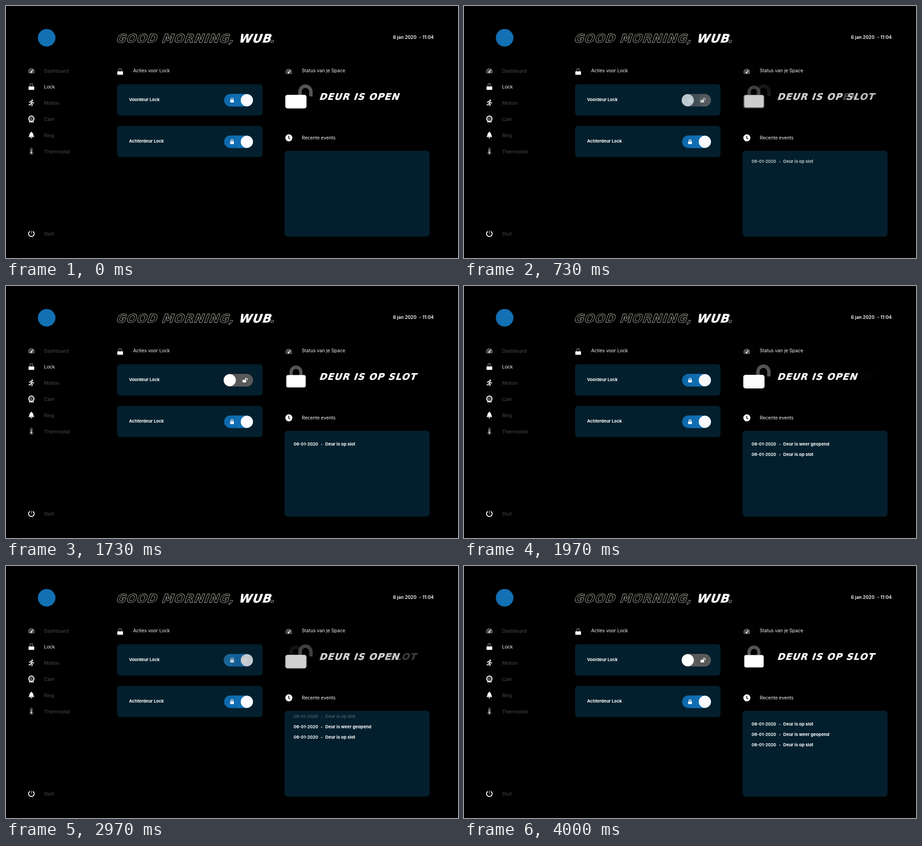
Recreate the animation shown at these times as an HTML page. Size 1001 px wide and 559 px high, loop 4030 ms.

```html
<!DOCTYPE html>
<html lang="nl">
<head>
<meta charset="utf-8">
<title>Lock dashboard</title>
<style>
  html, body { margin: 0; width: 100%; height: 100%; overflow: hidden; background: #000; }
  svg { display: block; width: 100vw; height: 100vh; }
  text { font-family: Inter, "Open Sans", sans-serif; fill: #fff; }
  .nav text { font-size: 10.6px; fill: #4b4b4f; }
  .nav .on { fill: #f4f4f4; }
  .head { font-size: 10.3px; fill: #f4f4f4; }
  .bold { font-size: 9.5px; font-weight: 700; }
  .date { font-size: 10.1px; font-weight: 600; }
  .row text { font-size: 9.6px; font-weight: 700; }
  .row .day { font-size: 9.1px; }
  .wide text { font-family: "DejaVu Sans", sans-serif; font-weight: 700; stroke: #fff; stroke-width: .5; }
  .hello { font-size: 26px; letter-spacing: 1px; }
  .status { font-size: 20px; letter-spacing: 1.5px; }
  .wide .line { fill: none; stroke: #c4c4b8; stroke-width: .9; }
  .card { fill: #031f2d; }
  .grey { fill: #555; }
  .white { fill: #fff; }
  .arc { fill: none; stroke: #555; }
  .stroke { fill: none; stroke: #fff; stroke-linecap: round; stroke-linejoin: round; }
</style>
</head>
<body>
<svg viewBox="0 0 1001 559">
  <defs>
    <linearGradient id="blue">
      <stop offset="0" stop-color="#0d68aa"/>
      <stop offset="1" stop-color="#1474bb"/>
    </linearGradient>
    <g id="lock">
      <path class="arc" stroke-width="2.2" d="M-3.2 1V-3A3.2 3.2 0 0 1 3.2-3V1"/>
      <rect class="white" x="-6.3" y="0" width="12.6" height="7.6" rx="1"/>
    </g>
    <g id="gauge">
      <path class="grey" d="M-6.4 5.5A7.6 7.6 0 1 1 6.4 5.5Z"/>
      <path d="M-5.2 1.5h1.6M-3.7-2.3l1 1M0-4.3v1.6M5.2 1.5H3.6" stroke="#000" fill="none"/>
      <path class="stroke" stroke-width="1.4" d="M-.2 2.2L3-2.2"/>
      <circle class="white" cx="-.4" cy="2.8" r="1.7"/>
    </g>
    <g id="shut">
      <path class="stroke" stroke-width="1.4" d="M-2.4 0V-2A2.4 2.4 0 0 1 2.4-2V0"/>
      <rect class="white" x="-4.1" y="-.8" width="8.2" height="5.8" rx=".8"/>
    </g>
    <g id="ajar">
      <path class="stroke" stroke-width="1.4" d="M.8 0V-2A2.2 2.2 0 0 1 5.2-2V-.6"/>
      <rect class="white" x="-5.2" y="-.8" width="8" height="5.8" rx=".8"/>
    </g>
    <g id="switchOn">
      <rect x="483" y="-14" width="64" height="28" rx="14" fill="url(#blue)"/>
      <use href="#shut" x="500.6" y="0"/>
      <circle cx="533.4" cy="0" r="13.5" fill="#fbfbff"/>
    </g>
    <g id="switchOff">
      <rect x="482" y="-14" width="65" height="28" rx="14" fill="#595959"/>
      <use href="#ajar" x="529" y="0"/>
      <circle class="white" cx="495.5" cy="0" r="13.5"/>
    </g>
  </defs>
  <rect width="1001" height="559"/>

  <circle cx="90" cy="70.5" r="19.5" fill="#1270b3"/>

  <g class="wide hello">
    <text class="line" transform="translate(242.5 80.8) skewX(-19)">GOOD MORNING,</text>
    <text transform="translate(514 80.8) skewX(-19)">WUB</text>
    <text class="line" transform="translate(584 80.8) skewX(-19)">.</text>
  </g>
  <g class="date">
    <text x="857" y="73">6 jan 2020</text>
    <text x="915" y="73">-</text>
    <text x="947.3" y="73" text-anchor="end">11:04</text>
  </g>

  <g class="nav">
    <use href="#gauge" x="56.3" y="144"/>
    <use href="#lock" x="56.2" y="178.4"/>
    <g transform="translate(56 215)">
      <circle class="white" cx="2" cy="-5.6" r="1.8"/>
      <path class="stroke" stroke-width="1.9" d="M-4-1.2L-2-3.4L1.2-2.6L-.6 1.2L2.2 3L1.2 6.4M-1 2L-2.4 4.2H-5.2M1.6-2L3.2 0H5.4"/>
    </g>
    <g transform="translate(56.2 250)">
      <path class="white" d="M-5.8 8L-3.6 5.2H3.6L5.8 8Z"/>
      <circle class="white" r="6.9"/>
      <circle r="4.9" fill="#222"/>
      <circle r="3.8" class="grey"/>
    </g>
    <g transform="translate(56.2 286)">
      <path class="white" d="M-6.4 4.4C-3.6 2-5-5.2 0-6C5-5.2 3.6 2 6.4 4.4Z"/>
      <circle class="white" cy="-6.2" r="1"/>
      <path class="white" d="M-2 5.4H2A2 2 0 0 1-2 5.4Z"/>
    </g>
    <g transform="translate(56.2 322)">
      <path d="M-2.2 1.2V-5A2.2 2.2 0 0 1 2.2-5V1.2A3.5 3.5 0 1 1-2.2 1.2Z" fill="#111" stroke="#666" stroke-width="1.3"/>
      <path class="stroke" stroke-width="1.3" d="M0-3V3.5"/>
      <circle class="white" cy="3.8" r="1.7"/>
    </g>
    <g transform="translate(56.2 505)">
      <path class="stroke" stroke-width="2" d="M-4-4.6A6.2 6.2 0 1 0 4-4.6"/>
      <path d="M0-6.2V0" stroke="#777" stroke-width="2" stroke-linecap="round"/>
    </g>
    <text x="84.2" y="148.2">Dashboard</text>
    <text x="84.2" y="183" class="on">Lock</text>
    <text x="84.2" y="218.8">Motion</text>
    <text x="84.2" y="255">Cam</text>
    <text x="84.2" y="290.6">Ring</text>
    <text x="84.2" y="326.6">Thermostat</text>
    <text x="84.2" y="508.6">Sluit</text>
  </g>

  <use href="#lock" x="252.8" y="145"/>
  <text class="head" x="281.5" y="147.2">Acties voor Lock</text>
  <rect class="card" x="246" y="173.5" width="322" height="69.5" rx="7"/>
  <rect class="card" x="246" y="266" width="322" height="69.3" rx="7"/>
  <text class="bold" x="272.5" y="211">Voordeur Lock</text>
  <text class="bold" x="272.5" y="303.3">Achterdeur Lock</text>
  <use href="#switchOn" y="301.2"/>

  <use href="#gauge" x="626.3" y="145.3"/>
  <text class="head" x="655" y="147.2">Status van je Space</text>
  <circle class="white" cx="626.4" cy="292.6" r="7.8"/>
  <path d="M626.2 287.8V293L629 295.4" fill="none" stroke="#222" stroke-width="1.9"/>
  <text class="head" x="655" y="295.6">Recente events</text>
  <rect class="card" x="617" y="321" width="321" height="190.5" rx="7"/>

  <g id="open">
    <use href="#switchOn" y="209"/>
    <path class="arc" stroke-width="7.6" d="M651 199V190A12.1 12.1 0 0 1 675.2 190V200.5"/>
    <rect class="white" x="618.5" y="197" width="47" height="30.3" rx="5"/>
    <g class="wide status"><text transform="translate(693 208) skewX(-19)">DEUR IS OPEN</text></g>
  </g>
  <g id="closed">
    <use href="#switchOff" y="209"/>
    <path class="arc" stroke-width="7.2" d="M631.4 199V191A10.8 10.8 0 0 1 653 191V199"/>
    <rect class="white" x="620.7" y="197.6" width="43" height="27.5" rx="4"/>
    <g class="wide status"><text transform="translate(693 208) skewX(-19)">DEUR IS OP SLOT</text></g>
  </g>

  <g class="row">
    <text class="day" x="637">06-01-2020</text><text x="697">-</text><text x="707">Deur is op slot</text>
  </g>
  <g class="row">
    <text class="day" x="637">06-01-2020</text><text x="697">-</text><text x="707">Deur is weer geopend</text>
  </g>
  <g class="row">
    <text class="day" x="637">06-01-2020</text><text x="697">-</text><text x="707">Deur is op slot</text>
  </g>
</svg>
<script>
  const LOOP = 4030, FADE = 300, STEP = 23, TOP = 331.2;
  const clicks = [625, 1745, 2945];
  const open = document.getElementById('open');
  const closed = document.getElementById('closed');
  const rows = [...document.querySelectorAll('.row')];

  const easeOut = u => 1 - (1 - u) ** 3;
  const progress = (t, start) => easeOut(Math.min(1, Math.max(0, (t - start) / FADE)));

  function draw(t) {
    const p = clicks.map(start => progress(t, start));
    const shut = p[0] - p[1] + p[2];
    open.setAttribute('opacity', 1 - shut);
    closed.setAttribute('opacity', shut);
    // The stronger state lies on top.
    if (shut > .5) open.after(closed);
    else closed.after(open);
    // Each new event pushes itself and all older rows down one step.
    rows.forEach((row, i) => {
      const shift = p.slice(i).reduce((a, b) => a + b, 0);
      row.setAttribute('transform', `translate(0 ${TOP + STEP * shift})`);
      row.setAttribute('opacity', p[i]);
    });
  }

  const begin = performance.now();
  function tick() {
    draw((performance.now() - begin) % LOOP);
    requestAnimationFrame(tick);
  }
  draw(0);
  tick();
</script>
</body>
</html>
```
